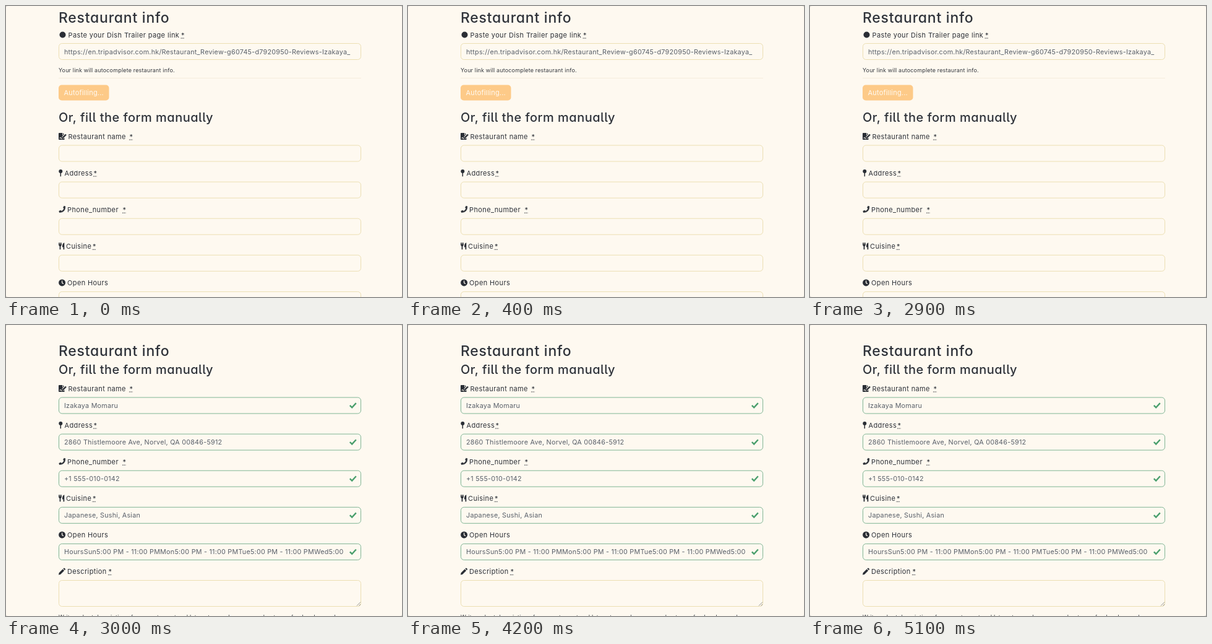
An HTML page for the animation above (5.2 s loop, 640 by 470 pixels).

```html
<!DOCTYPE html>
<html lang="en">
<head>
<meta charset="utf-8">
<title>Restaurant form</title>
<style>
  html, body { margin: 0; width: 100%; height: 100%; overflow: hidden; background: #d5d2cc; }
  svg { display: block; width: 640px; height: 470px; font-family: Inter, "Open Sans", sans-serif; }
  .head { font-weight: 500; fill: #2f333a; font-feature-settings: "cv11", "cv05"; }
  .label { font-size: 11px; letter-spacing: .38px; fill: #2d3138; }
  .value { font-size: 10.8px; letter-spacing: .22px; fill: #59606a; }
  .help { font-size: 9px; letter-spacing: .16px; fill: #34383f; }
  .button { font-size: 11px; letter-spacing: .2px; fill: #fffaf2; }
  .box { fill: none; stroke: #ecdfb2; }
  .valid { stroke: #7fb594; }
  .check { fill: none; stroke: #4a9f6d; stroke-width: 2.4; }
  .icon { fill: #2a2e35; }
  .line { fill: none; stroke: #2a2e35; }
  .cut { fill: none; stroke: #fef9f0; }
</style>
</head>
<body>
<svg viewBox="0 0 640 470">
  <clipPath id="wide"><rect x="90" width="475" height="470"/></clipPath>
  <clipPath id="narrow"><rect x="90" width="458.5" height="470"/></clipPath>
  <rect width="640" height="470" rx="3" fill="#fef9f0"/>
  <g id="before"></g>
  <g id="after"></g>
</svg>
<script>
const LOOP = 5200, FILLED_AT = 3000, PITCH = 59.1;

// Icons sit in a box 12 units high, vertically centred on 6.
const icons = {
  badge: '<circle class="icon" cx="6.5" cy="6" r="5"/>',
  sign: `<path class="icon" d="M1 .5H6V4H9.5V11.5H1Q0 11.5 0 10.5V1.5Q0 .5 1 .5ZM6.8 .5 9.5 3.2H6.8Z"/>
    <path class="cut" stroke-width="4" d="M6.5 8.5 12 3"/>
    <path class="line" stroke-width="2.4" d="M6.4 8.6 12 3"/>
    <path class="cut" d="M1.5 9.5 3 7.7 4 9.5H6"/>`,
  pin: '<circle class="icon" cx="3.3" cy="3.3" r="3"/><path class="line" stroke-width="1.5" d="M3.3 5V11.7"/>',
  phone: `<path class="icon" stroke="#2a2e35" stroke-width=".6" stroke-linejoin="round"
    d="M10.9 1 8.7.5 7.5 3.2 8.9 4.4Q7.6 7.4 4.7 8.7L3.5 7.3 .8 8.5 1.3 10.7Q10.9 10.9 10.9 1Z"/>`,
  fork: `<path class="line" stroke-width="1.2" d="M.7.5V4M2.5.5V4M4.3.5V4"/>
    <path class="icon" d="M.1 3.3H4.9Q4.9 5.8 3.4 6.2V11.5H1.6V6.2Q.1 5.8 .1 3.3ZM9.3.5V11.5H7.5V7.8H6Q5.7 1.5 9.3.5Z"/>`,
  clock: '<circle class="icon" cx="5.6" cy="6" r="5.5"/><path class="cut" stroke-width="1.2" d="M5.6 2.6V6.2L7.9 7.8"/>',
  pencil: `<path class="icon" d="M0 11.5 .7 8.3 6.7 2.3 9.2 4.8 3.2 10.8ZM7.4 1.6 8.3.7Q9 .2 9.7.8L10.7 1.8Q11.3 2.5 10.8 3.2L9.9 4.1Z"/>`
};

const text = (cls, x, y, str, extra = '') => `<text class="${cls}" x="${x}" y="${y}" ${extra}>${str}</text>`;
const heading = (y, size, space, str) =>
  text('head', 85, y, str, `font-size="${size}" letter-spacing="${space}"`);
const box = (y, h = 26, cls = '') =>
  `<rect class="box ${cls}" x="85.5" y="${y}" width="488" height="${h}" rx="5"/>`;

// y is the middle of the label line.
function label(y, icon, x, str, star) {
  const mark = star ? text('label', star, y + 4, '*') +
    `<path class="line" stroke-dasharray="1 .6" d="M${star - .5} ${y + 5.5}h5.5"/>` : '';
  return `<g transform="translate(85 ${y - 6})">${icons[icon]}</g>` + text('label', x, y + 4, str) + mark;
}

const hours = 'Hours' + ['Sun', 'Mon', 'Tue', 'Wed'].map(d => d + '5:00 PM - 11:00 PM').join('');
const fields = [
  ['sign', 100.5, 'Restaurant name', 199.5, 'Izakaya Momaru'],
  ['pin', 94.5, 'Address', 141.5, '2860 Thistlemoore Ave, Norvel, QA 00846-5912'],
  ['phone', 99, 'Phone_number', 188.5, '+1 555-010-0142'],
  ['fork', 97, 'Cuisine', 140, 'Japanese, Sushi, Asian'],
  ['clock', 99, 'Open Hours', 0, hours]
];

const form = (top, filled) => fields.map(([icon, x, name, star, value], i) => {
  const y = top + i * PITCH;
  return label(y, icon, x, name, star) + box(y + 14.5, 26, filled ? 'valid' : '') +
    (filled ? text('value', 94, y + 31.5, value, 'clip-path="url(#narrow)"') +
      `<path class="check" d="M555.8 ${y + 27.4}l3.4 3.4 6.6-7.2"/>` : '');
}).join('');

before.innerHTML =
  heading(26.5, 23, .75, 'Restaurant info') +
  label(46.5, 'badge', 100.5, 'Paste your Dish Trailer page link', 283) +
  box(60.5) +
  text('value', 94, 77.7, 'https://en.tripadvisor.com.hk/Restaurant_Review-g60745-d7920950-Reviews-Izakaya_', 'clip-path="url(#wide)"') +
  text('help', 85, 107.3, 'Your link will autocomplete restaurant info.') +
  '<path d="M85 116.5H574" stroke="#f5eddd"/>' +
  '<rect x="85" y="127.5" width="81.5" height="25" rx="5" fill="#fdca88"/>' +
  text('button', 93.5, 144, 'Autofilling...') +
  heading(187, 20, .47, 'Or, fill the form manually') +
  form(210.5, false);

after.innerHTML =
  heading(49.5, 23, .75, 'Restaurant info') +
  heading(79, 20, .47, 'Or, fill the form manually') +
  form(102.5, true) +
  label(398, 'pencil', 99, 'Description', 165.5) +
  box(412.5, 42) +
  '<path d="M567 453.5l6-6M570.5 453.5l2.5-2.5" stroke="#77756f" stroke-width=".8"/>' +
  text('help', 85, 475.3, 'Write a short description of your restaurant and let customers know more about your food and your place.');

function draw(now) {
  const filled = now % LOOP >= FILLED_AT;
  before.style.display = filled ? 'none' : '';
  after.style.display = filled ? '' : 'none';
  requestAnimationFrame(draw);
}
draw(performance.now());
</script>
</body>
</html>
```
